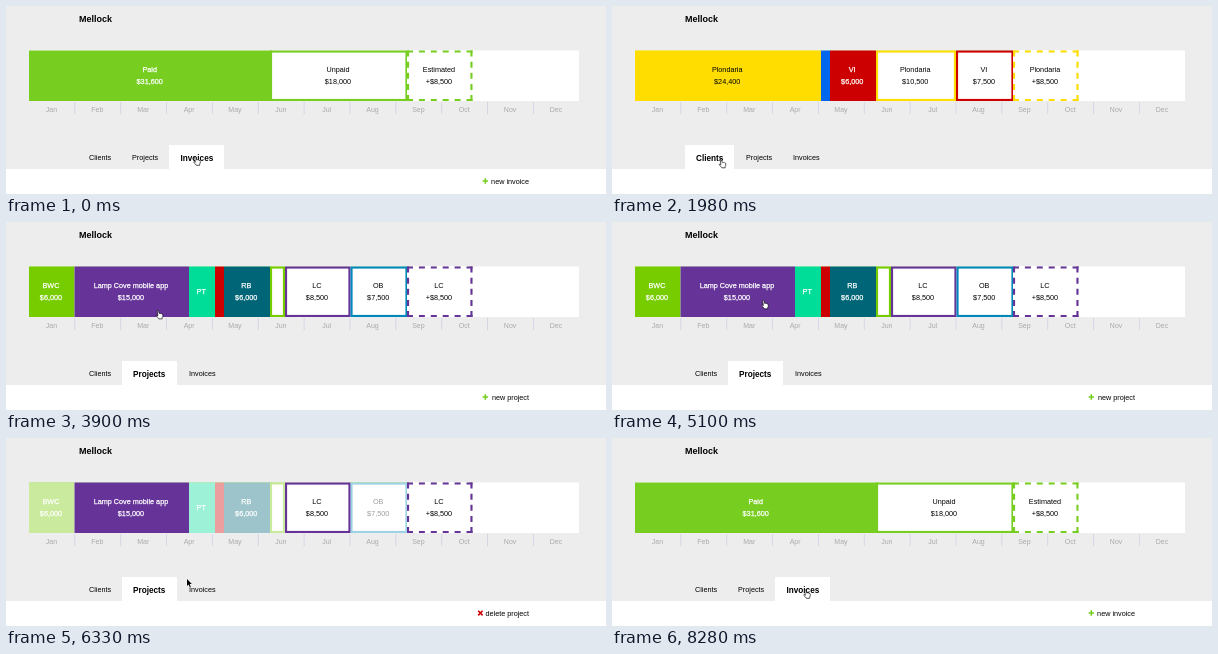
Recreate the animation shown at these times as an HTML page. Size 600 by 188 pixels, loop 8430 ms.

```html
<!DOCTYPE html>
<html lang="en">
<head>
<meta charset="utf-8">
<title>Invoice timeline</title>
<style>
html, body { margin: 0; width: 100%; height: 100%; overflow: hidden; background: #fff; }
svg { display: block; width: 600px; height: 188px; font: 7.25px "Liberation Sans", Arial, sans-serif; }
</style>
</head>
<body>
<svg id="stage" viewBox="0 0 600 188"></svg>
<script>
const LOOP = 8430, FADE = 400;
const CLICK = { clients: 1230, projects: 3165, block: 5200, invoices: 7315 };
const GREEN = '#77ce20', YELLOW = '#ffdd00', RED = '#cc0000', BLUE = '#0066ee',
      PURPLE = '#663399', LIME = '#77cc00', MINT = '#00dd99', TEAL = '#006677', SKY = '#0088bb';
const TOP = 44.5, BOTTOM = 95, LINE = 2.1;

const stage = document.getElementById('stage');

function add(parent, tag, attrs, text) {
  const el = document.createElementNS('http://www.w3.org/2000/svg', tag);
  for (const key in attrs) el.setAttribute(key, attrs[key]);
  if (text) el.textContent = text;
  parent.append(el);
  return el;
}
const rect = (parent, x, y, width, height, fill, more) =>
  add(parent, 'rect', { x, y, width, height, fill, ...more });
const label = (parent, x, y, text, more) => add(parent, 'text', { x, y, ...more }, text);
const show = (el, on) => el.setAttribute('visibility', on ? 'visible' : 'hidden');

// Blocks: left, right, colour, name, amount, kind
const SOLID = 0, OUTLINE = 1, DASHED = 2;
const views = {
  invoices: [
    [23, 266, GREEN, 'Paid', '$31,600', SOLID],
    [264, 401.5, GREEN, 'Unpaid', '$18,000', OUTLINE],
    [401, 466.5, GREEN, 'Estimated', '+$8,500', DASHED]
  ],
  clients: [
    [23, 209, YELLOW, 'Plondaria', '$24,400', SOLID],
    [209, 218, BLUE, '', '', SOLID],
    [218, 264, RED, 'VI', '$6,000', SOLID],
    [264, 344, YELLOW, 'Plondaria', '$10,500', OUTLINE],
    [344, 401.5, RED, 'VI', '$7,500', OUTLINE],
    [401, 466.5, YELLOW, 'Plondaria', '+$8,500', DASHED]
  ],
  projects: [
    [23, 68.5, LIME, 'BWC', '$6,000', SOLID],
    [68.5, 183, PURPLE, 'Lamp Cove mobile app', '$15,000', SOLID],
    [183, 209, MINT, 'PT', '', SOLID],
    [209, 218, RED, '', '', SOLID],
    [218, 264, TEAL, 'RB', '$6,000', SOLID],
    [264, 279, LIME, '', '', OUTLINE],
    [279, 344.5, PURPLE, 'LC', '$8,500', OUTLINE],
    [344.5, 401.5, SKY, 'OB', '$7,500', OUTLINE],
    [401, 466.5, PURPLE, 'LC', '+$8,500', DASHED]
  ]
};

// One dashed side, with a whole dash at each end
function dashedSide(parent, x1, y1, x2, y2, stroke) {
  const dash = 6, length = Math.hypot(x2 - x1, y2 - y1);
  const count = Math.round((length + dash) / (2 * dash));
  const gap = (length - count * dash) / (count - 1);
  add(parent, 'line', { x1, y1, x2, y2, stroke, 'stroke-width': LINE, 'stroke-dasharray': `${dash} ${gap}` });
}

function drawBlock(parent, [left, right, color, name, amount, kind]) {
  const g = add(parent, 'g', { 'text-anchor': 'middle' });
  const width = right - left, height = BOTTOM - TOP, half = LINE / 2, mid = (left + right) / 2 - 0.8;
  if (kind === SOLID) rect(g, left, TOP, width, height, color);
  if (kind === OUTLINE) rect(g, left + half, TOP + half, width - LINE, height - LINE, '#fff',
    { stroke: color, 'stroke-width': LINE });
  if (kind === DASHED) {
    rect(g, left, TOP, width, height, '#fff');
    for (const y of [TOP + half, BOTTOM - half]) dashedSide(g, left, y, right, y, color);
    for (const x of [left + half, right - half]) dashedSide(g, x, TOP, x, BOTTOM, color);
  }
  // Light text looks heavier than dark text
  const ink = kind !== SOLID || color === YELLOW ? { fill: '#000' }
    : { fill: '#fff', stroke: '#fff', 'stroke-width': 0.25 };
  label(g, mid, amount ? 66.2 : 72.2, name, ink);
  label(g, mid, 78.1, amount, ink);
  return g;
}

// Page, title and months
rect(stage, 0, 0, 600, 163, '#ededed');
label(stage, 73, 15.8, 'Mellock', { 'font-size': 9, 'font-weight': 'bold' });
rect(stage, 23, TOP, 550, BOTTOM - TOP, '#fff');
'Jan Feb Mar Apr May Jun Jul Aug Sep Oct Nov Dec'.split(' ').forEach((month, i) => {
  label(stage, 45.5 + i * 45.86, 106, month, { 'text-anchor': 'middle', fill: '#aaa', 'font-size': 7 });
  if (i) rect(stage, 22.5 + i * 45.86, 96, 0.9, 12, '#d6d2e6');
});

// Timeline layers, later ones cover earlier ones
const layers = {}, others = [];
for (const view in views) {
  const g = layers[view] = add(stage, 'g');
  rect(g, 23, TOP, 443.5, BOTTOM - TOP, '#fff');
  for (const block of views[view]) {
    const el = drawBlock(g, block);
    if (view === 'projects' && block[2] !== PURPLE) others.push(el);
  }
}

// Tabs: text positions and the extent of the active one
const tabs = {
  invoices: { xs: [83, 126, 174.5], box: [163, 55] },
  clients: { xs: [84, 134, 181], box: [73, 49] },
  projects: { xs: [83, 127, 183], box: [116, 55] }
};
for (const view in tabs) {
  const { xs, box } = tabs[view];
  const g = tabs[view].el = add(stage, 'g');
  rect(g, box[0], 139, box[1], 24.5, '#fff');
  ['Clients', 'Projects', 'Invoices'].forEach((name, i) => {
    const active = name.toLowerCase() === view;
    label(g, xs[i], active ? 154.6 : 154.3, name,
      active ? { 'font-size': 8.2, 'font-weight': 'bold' } : {});
  });
}

// Actions at the lower right
function action(text, icon) {
  const g = add(stage, 'g');
  label(g, 523, 177.6, text, { 'text-anchor': 'end' });
  add(g, 'path', icon);
  return g;
}
const plus = { d: 'M476.6 175h5.4M479.3 172.3v5.4', stroke: GREEN, 'stroke-width': 1.6 };
const cross = { d: 'M472.2 172.8l4.4 4.6M476.6 172.8l-4.4 4.6', stroke: RED, 'stroke-width': 1.6 };
const newInvoice = action('new invoice', plus);
const newProject = action('new project', plus);
const deleteProject = action('delete project', cross);

// Cursors, with the tip at the origin
const cursor = add(stage, 'g');
const hand = add(cursor, 'path', {
  d: 'M1.2 .6Q2.4-.1 2.8 1.2L3.4 3.7Q4.2 3 4.8 3.8Q5.7 3.3 6.1 4.2Q7.1 4 7.3 5.2Q7.6 7 6.6 8.2V9.5H3.1Q2.4 8 .5 6.6Q-.2 5.5 1.1 5.5L2 6.1Z',
  fill: '#fff', stroke: '#000', 'stroke-width': 0.7, 'stroke-linejoin': 'round', transform: 'scale(.93)'
});
const arrow = add(cursor, 'path', {
  d: 'M0 0V7.4L1.7 5.9L2.9 8.7L4.1 8.2L2.9 5.4H5.2Z',
  fill: '#000', stroke: '#fff', 'stroke-width': 0.7, 'paint-order': 'stroke', transform: 'scale(.93)'
});

// Cursor path: time, x, y
const path = [
  [0, 187.5, 150.5], [100, 187.5, 150.5], [1080, 91.5, 152], [1830, 91.5, 152],
  [1980, 107, 153], [2490, 110, 153], [2640, 110, 153], [3030, 142.5, 151.5],
  [3450, 142.5, 151.5], [4020, 151, 80], [4620, 149.5, 78], [5880, 149.5, 78],
  [6330, 181, 141], [6690, 188, 151], [7890, 188, 151], [7950, 191.5, 151.5], [LOOP, 191.5, 151.5]
];

const clamp = v => Math.min(1, Math.max(0, v));
const fade = (t, start) => 1 - (1 - clamp((t - start) / FADE)) ** 2;

function cursorAt(t) {
  const i = path.findIndex(p => p[0] > t);
  const [t0, x0, y0] = path[i - 1], [t1, x1, y1] = path[i];
  const u = (t - t0) / (t1 - t0), k = u * u * (3 - 2 * u);
  return [x0 + (x1 - x0) * k, y0 + (y1 - y0) * k];
}

function render(t) {
  const view = t < CLICK.clients || t >= CLICK.invoices ? 'invoices'
    : t < CLICK.projects ? 'clients' : 'projects';
  const selected = t >= CLICK.block;

  layers.clients.setAttribute('opacity', t < CLICK.projects + FADE ? fade(t, CLICK.clients) : 0);
  layers.projects.setAttribute('opacity', fade(t, CLICK.projects) * (1 - fade(t, CLICK.invoices)));
  others.forEach(el => el.setAttribute('opacity', 1 - 0.62 * fade(t, CLICK.block)));

  for (const name in tabs) show(tabs[name].el, name === view);
  show(newInvoice, view === 'invoices');
  show(newProject, view === 'projects' && !selected);
  show(deleteProject, view === 'projects' && selected);

  const [x, y] = cursorAt(t);
  const pointing = y < 95 || y > 146;
  cursor.setAttribute('transform', `translate(${x} ${y})`);
  show(hand, pointing);
  show(arrow, !pointing);
}

const began = performance.now();
function tick() {
  render((performance.now() - began) % LOOP);
  requestAnimationFrame(tick);
}
tick();
</script>
</body>
</html>
```
